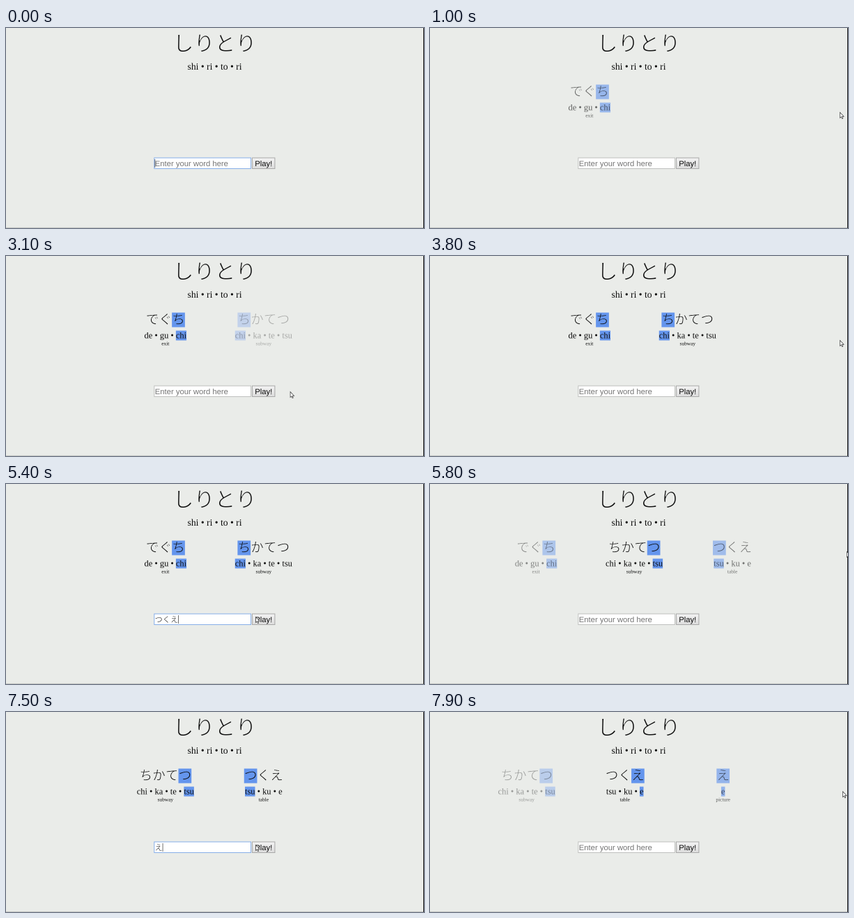
Animation, 600 px wide and 288 px high, one loop 8 s. Source, as an HTML page with a canvas:

```html
<!DOCTYPE html>
<html lang="ja">
<head>
<meta charset="utf-8">
<title>Shiritori</title>
<style>
  html, body { margin: 0; width: 100%; height: 100%; overflow: hidden; background: #eaece9; }
  canvas { display: block; width: 600px; height: 288px; }
</style>
</head>
<body>
<canvas id="stage" width="1200" height="576"></canvas>
<script>
const ctx = document.getElementById('stage').getContext('2d');
ctx.scale(2, 2);
const LOOP = 8000;
const GAP = 141;
const FIRST_SLOT = 228.8;
const BLUE = '#6495ed';
const INK = '#0c0c0c';
const serif = size => `${size}px "Liberation Serif", serif`;
const sans = size => `${size}px "Liberation Sans", sans-serif`;

// focus: field gains focus, step: time per kana, submit: Play is pressed
const rounds = [
  { kana: 'でぐち', sounds: ['de', 'gu', 'chi'], gloss: 'exit', focus: -1, type: 200, step: 100, submit: 650 },
  { kana: 'ちかてつ', sounds: ['chi', 'ka', 'te', 'tsu'], gloss: 'subway', focus: 2400, type: 2500, step: 80, submit: 2900 },
  { kana: 'つくえ', sounds: ['tsu', 'ku', 'e'], gloss: 'table', focus: 4600, type: 4800, step: 180, submit: 5485 },
  { kana: 'え', sounds: ['e'], gloss: 'picture', focus: 6800, type: 7100, step: 100, submit: 7530 }
];

// Each path is visible from its first to its last [time, x, y]
const pointerPaths = [
  [[500, 358, 191], [650, 358, 191], [900, 588, 121], [1950, 588, 121]],
  [[2750, 358, 191], [2900, 358, 191], [3200, 432, 197], [3320, 588, 121], [4600, 588, 121], [4700, 340, 192]],
  [[5300, 358, 191], [5485, 358, 191], [5700, 598, 97], [6800, 598, 97], [6900, 340, 192]],
  [[7400, 358, 191], [7530, 358, 191], [7680, 592, 114], [8000, 592, 114]]
];

const clamp = v => Math.min(1, Math.max(0, v));

// cubic-bezier(.25, .1, .25, 1)
function ease(x) {
  if (x <= 0 || x >= 1) return clamp(x);
  const bezier = (a, b, u) => 3 * a * u * (1 - u) ** 2 + 3 * b * u * u * (1 - u) + u ** 3;
  let low = 0, high = 1;
  for (let i = 0; i < 20; i++) {
    const mid = (low + high) / 2;
    if (bezier(.25, .25, mid) < x) low = mid; else high = mid;
  }
  return bezier(.1, 1, low);
}

const progress = (round, t) => ease((t - round.submit) / 1000);

function text(str, x, y, font, color = INK, align = 'center') {
  ctx.font = font;
  ctx.fillStyle = color;
  ctx.textAlign = align;
  ctx.fillText(str, x, y);
}

// Kana with the outline cut away, for a lighter weight
const glyphs = new Map();
function thinGlyph(char, size) {
  const key = char + size;
  if (!glyphs.has(key)) {
    const em = size * 4;
    const glyph = document.createElement('canvas');
    glyph.width = glyph.height = em * 1.5;
    const g = glyph.getContext('2d');
    g.font = `300 ${em}px "Noto Sans CJK JP", "Noto Sans CJK", sans-serif`;
    g.textAlign = 'center';
    g.fillStyle = INK;
    g.fillText(char, em * .75, em * 1.2);
    g.globalCompositeOperation = 'destination-out';
    g.lineWidth = em * .032;
    g.lineJoin = 'round';
    g.strokeText(char, em * .75, em * 1.2);
    glyphs.set(key, glyph);
  }
  return glyphs.get(key);
}

function kana(str, left, y, size) {
  [...str].forEach((c, i) =>
    ctx.drawImage(thinGlyph(c, size), left + (i - .25) * size, y - size * 1.2, size * 1.5, size * 1.5));
}

function box(x, y, w, h, fill, stroke) {
  ctx.fillStyle = fill;
  ctx.fillRect(x, y, w, h);
  if (!stroke) return;
  ctx.strokeStyle = stroke;
  ctx.lineWidth = 1;
  ctx.strokeRect(x + .5, y + .5, w - 1, h - 1);
}

function drawWord(word, x, alpha, marked) {
  if (alpha <= 0) return;
  ctx.globalAlpha = alpha;
  const size = 18.7;
  const left = x - word.kana.length * size / 2;
  box(left + marked * size, 81.5, size, 21, BLUE);
  kana(word.kana, left, 97.6, size);

  const line = word.sounds.join(' • ');
  const before = word.sounds.slice(0, marked).map(s => s + ' • ').join('');
  ctx.font = serif(12.45);
  const start = x - ctx.measureText(line).width / 2;
  box(start + ctx.measureText(before).width, 107.5, ctx.measureText(word.sounds[marked]).width, 14, BLUE);
  text(line, start, 118.5, serif(12.45), INK, 'left');
  text(word.gloss, x, 128.5, serif(7.4));
  ctx.globalAlpha = 1;
}

function drawWords(t) {
  const newest = rounds.filter(r => t >= r.submit).length - 1;
  const shift = progress(rounds[2], t) + progress(rounds[3], t);
  for (let i = 0; i <= newest; i++) {
    const slot = i - shift;
    const alpha = Math.min(progress(rounds[i], t), clamp(1 + slot));
    const marked = i === newest && i > 0 ? 0 : rounds[i].kana.length - 1;
    drawWord(rounds[i], FIRST_SLOT + slot * GAP, alpha, marked);
  }
}

function drawForm(t) {
  const active = rounds.find(r => t >= r.focus && t < r.submit);
  const typed = active ? active.kana.slice(0, Math.max(0, Math.floor((t - active.type) / active.step) + 1)) : '';
  box(212.3, 186.5, 139.7, 16.5, '#fff', active ? '#86aee8' : '#bfc0be');
  if (typed) kana(typed, 213.5, 199, 11.2);
  else text('Enter your word here', 213.8, 199, sans(11.25), '#757575', 'left');
  if (active) box(213.5 + typed.length * 11.2, 189, .7, 12, '#333');

  const face = ctx.createLinearGradient(0, 187, 0, 203);
  face.addColorStop(0, '#f3f3f3');
  face.addColorStop(1, '#dcdcdc');
  box(353, 186.5, 33.4, 16.5, face, '#a8a8a8');
  text('Play!', 369.7, 199, sans(11.25));
}

const arrow = new Path2D('M.5 .5V8.5L2.3 6.9L3.5 9.5L4.7 9L3.6 6.4H6Z');
function drawPointer(t) {
  const path = pointerPaths.find(p => t >= p[0][0] && t < p[p.length - 1][0]);
  if (!path) return;
  const i = path.findIndex(p => p[0] > t);
  const [t0, x0, y0] = path[i - 1], [t1, x1, y1] = path[i];
  const k = (t - t0) / (t1 - t0);
  ctx.save();
  ctx.translate(x0 + (x1 - x0) * k, y0 + (y1 - y0) * k);
  ctx.fillStyle = '#fff';
  ctx.strokeStyle = '#333';
  ctx.lineWidth = .7;
  ctx.fill(arrow);
  ctx.stroke(arrow);
  ctx.restore();
}

function draw(t) {
  box(0, 0, 600, 288, '#eaece9');
  kana('しりとり', 239.5, 33, 30);
  text('shi • ri • to • ri', 299.5, 60.2, serif(13.65));
  drawWords(t);
  drawForm(t);
  box(0, 287, 600, 1, '#c8cac7');
  box(599, 0, 1, 288, '#111');
  drawPointer(t);
}

const begin = performance.now();
function tick() {
  draw((performance.now() - begin) % LOOP);
  requestAnimationFrame(tick);
}
tick();
</script>
</body>
</html>
```
